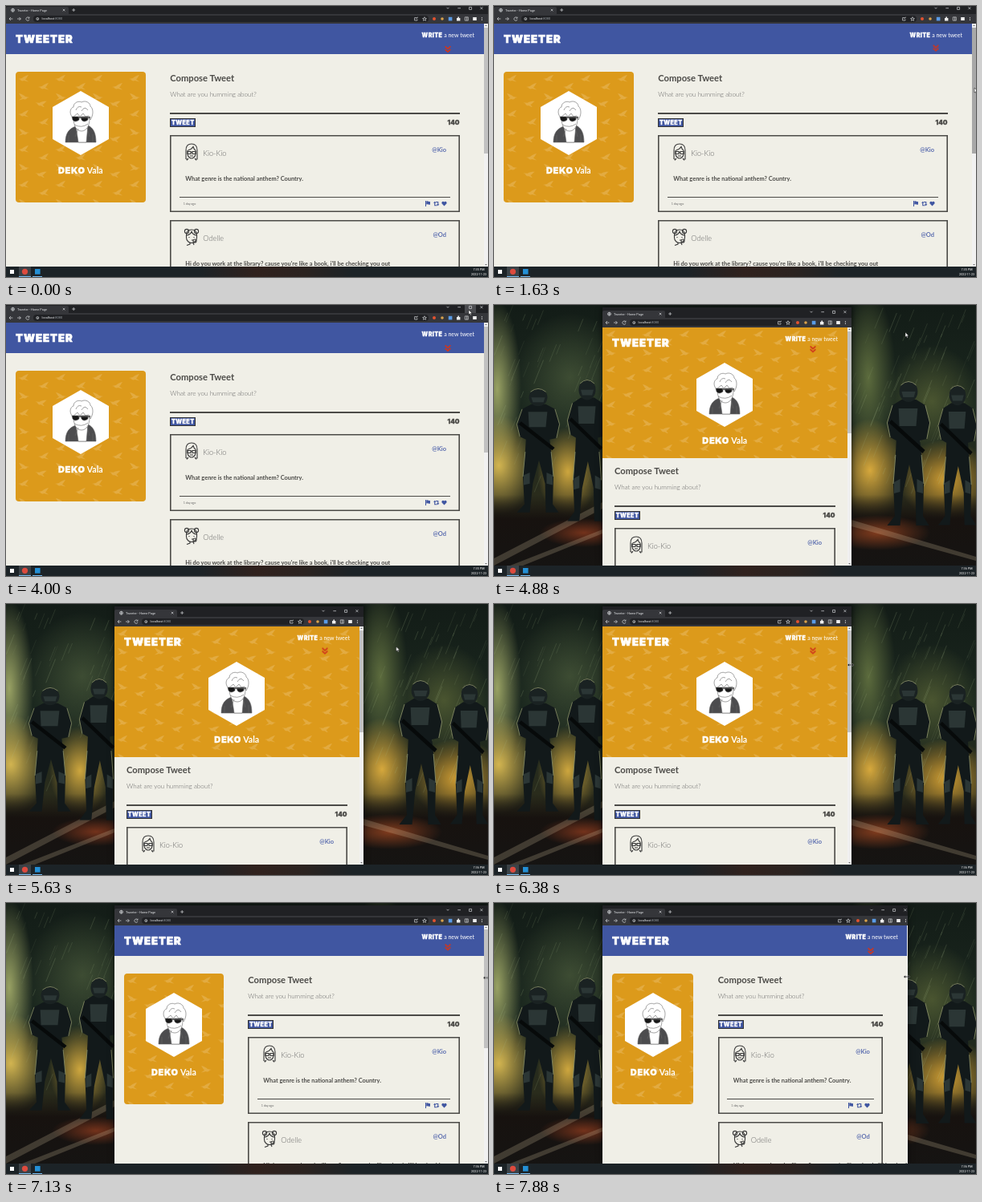
Write an HTML page that moves like this. It is 600 px wide and 338 px high and loops after 8 s.

```html
<!DOCTYPE html>
<html lang="en">
<head>
<meta charset="utf-8">
<title>Tweeter - Home Page</title>
<style>
:root { --blue: #4056a1; --gold: #dc9a1b; --cream: #f0efe7; --ink: #4b4a47; --loop: 8s linear infinite; }
html, body { margin: 0; width: 100%; height: 100%; overflow: hidden; background: #16211b; }
.stage { position: relative; width: 600px; height: 338px; overflow: hidden; font: 300 8.1px/1 Lato, "Open Sans", sans-serif; color: #666; white-space: nowrap; }
.stage * { box-sizing: border-box; }
.abs, .stage svg, .stage .bar div, .col > *, .tweet > * { position: absolute; }
svg { overflow: visible; fill: none; }
.heavy { font-family: Inter, Roboto, sans-serif; font-weight: 900; letter-spacing: .06em; -webkit-text-stroke: .3px currentColor; }

/* desktop */
.desk { inset: 0; background:
  radial-gradient(55px 18px at 112px 284px, #8a3a1ecc, transparent),
  radial-gradient(65px 22px at 478px 284px, #9c4621cc, transparent),
  linear-gradient(transparent 70%, #17120f 79%, #151413),
  radial-gradient(46px 62px at 6px 200px, #d2b450, transparent),
  radial-gradient(38px 56px at 92px 208px, #cda63e, transparent),
  radial-gradient(30px 110px at 4px 105px, #98a163, transparent),
  radial-gradient(46px 64px at 468px 206px, #d6a83c, transparent),
  radial-gradient(58px 50px at 562px 218px, #cf9d33, transparent),
  radial-gradient(34px 110px at 466px 90px, #5c6b3d, transparent),
  radial-gradient(60px 70px at 545px 120px, #4a5530, transparent),
  radial-gradient(70px 80px at 95px 90px, #3d4c33, transparent),
  linear-gradient(#131c17, #1b281f 40%, #2a2c1c 70%); }

/* browser window */
.win { bottom: 13px; overflow: hidden; background: var(--cream); box-shadow: 0 0 7px #000a; animation: win var(--loop); }
.layout { top: 0; bottom: 0; left: 0; container-type: inline-size; animation: layout var(--loop); }
@keyframes win {
  0%, 53.1% { left: 0; top: -3px; width: 600px; }
  53.11%, 80.6% { left: 135px; top: 3px; width: 310px; }
  87.5%, 90% { left: 135px; top: 3px; width: 465px; }
  98.5% { left: 135px; top: 3px; width: 380px; }
  100% { left: 135px; top: 3px; width: 365px; }
}
@keyframes layout {
  0%, 53.1% { width: 600px; }
  53.11%, 81.1% { width: 310px; }
  88%, 90.5% { width: 465px; }
  99% { width: 380px; }
  100% { width: 370px; }
}
.bar { inset: 0 0 auto; height: 25px; background: #202124; font: 400 3.9px/1 Roboto, sans-serif; color: #e8eaed; }
.bar .tab { left: 0; top: 4px; width: 78px; height: 10px; background: #35363a; border-radius: 2px 2px 0 0; padding: 2.5px 0 0 14px; }
.bar .tools { left: 0; right: 0; top: 13px; height: 12px; background: #35363a; }
.bar .url { left: 34px; right: 74px; top: 2px; height: 8px; border-radius: 4px; background: #202124; padding: 2.2px 0 0 10.5px; }
.bar i { font-style: normal; color: #9aa0a6; }
.bar svg { top: 0; stroke: #d5d7da; stroke-width: .7; }
.hover { right: 15px; top: 0; width: 14px; height: 13px; background: #4a4b4f; opacity: 0; animation: hover var(--loop); }
@keyframes hover { 0%, 48% { opacity: 0; } 48.01%, 53.1% { opacity: 1; } 53.11%, 100% { opacity: 0; } }

/* page */
.page { --w: calc(100cqw - 5.5px); top: 25px; bottom: 0; left: 0; width: var(--w); background: var(--cream); overflow: hidden; }
.head { inset: 0 0 auto; height: 38px; background: var(--blue); color: #fff; z-index: 1; }
.logo { left: 12px; top: 12.9px; font-size: 13px; letter-spacing: .08em; -webkit-text-stroke-width: .7px; }
.write { right: 11.5px; top: 10.5px; font-size: 7px; font-weight: 400; }
.write b { font-size: 7.1px; }
.head svg { right: 40px; top: 0; width: 10px; height: 10px; stroke: #d0361d; stroke-width: 1.6; animation: bob 1s cubic-bezier(.37,0,.63,1) infinite alternate; }
@keyframes bob { from { transform: translateY(27px); } to { transform: translateY(22px); } }
.profile { left: 12px; top: 60px; width: calc(var(--w) * .28 - 4.8px); height: 163px; background: var(--gold); border-radius: 4px; overflow: hidden; outline: .8px dashed #f0efe777; outline-offset: -.6px; }
.profile .birds { width: 100%; height: 100%; }
.profile .hex { left: calc(50% - 35px); top: 24px; width: 70px; height: 80px; }
.name { left: 0; right: 0; top: 117.5px; text-align: center; color: #fff; font-size: 10.6px; font-weight: 700; }
.name b { font-size: 11px; }
.col { left: calc(var(--w) * .281 + 37.2px); right: 30px; top: 0; bottom: 0; }
.col h1 { margin: 0; top: 61.5px; font-size: 11.2px; font-weight: 700; color: var(--ink); }
.ask { top: 84px; }
.rule { left: 0; right: 0; top: 111.2px; height: 1.4px; background: var(--ink); }
.send { left: 0; top: 117.5px; width: 32px; height: 11.5px; border: 1px solid #333; background: var(--blue); color: #fff; font-size: 7.2px; text-align: center; padding-top: 1.3px; }
.count { right: 0; top: 119px; font-size: 8px; color: var(--ink); letter-spacing: 0; }
.tweet { left: 0; right: 0; height: 96px; box-shadow: inset 0 0 0 1.6px var(--ink); }
.tweet .face { left: 17px; top: 10px; width: 20px; height: 22px; stroke: #3a3a3a; stroke-width: 1.1; }
.tweet .who { left: 41px; top: 17.5px; font-size: 9.1px; }
.tweet .at { right: 16.5px; top: 14.5px; font-size: 7.5px; font-weight: 700; color: #5b6daf; }
.tweet .say { left: 19px; top: 50.5px; font-size: 7.4px; font-weight: 700; color: var(--ink); }
.tweet hr { margin: 0; border: 0; left: 11.5px; right: 11.5px; top: 76.8px; height: 1.4px; background: var(--ink); }
.tweet .ago { left: 16.5px; top: 84px; font-size: 3.7px; font-weight: 400; }
.tweet .acts { right: 16px; top: 82px; width: 27px; height: 7px; fill: var(--blue); }
.scroll { right: 0; top: 25px; bottom: 0; width: 5.5px; background: #f1f1f1; }
.scroll svg { fill: #666; }
.thumb { left: .6px; right: .4px; top: 5px; height: 148px; background: #c1c1c1; animation: thumb var(--loop); }
@keyframes thumb { 0%, 19.5% { background: #c1c1c1; } 19.51%, 42% { background: #a8a8a8; } 42.01%, 100% { background: #c1c1c1; } }
@container (min-width: 550px) { .thumb { height: 157px; } }
@container (max-width: 326px) {
  .head { background: none; }
  .head svg { right: 38px; }
  .profile { left: 0; top: 0; width: 100%; border-radius: 0; outline: 0; }
  .profile .hex { top: 44px; }
  .name { top: 135.5px; }
  .col { left: 15px; right: 15px; top: 111px; }
  .thumb { height: 127px; }
}

/* taskbar and pointer */
.task { left: 0; right: 0; bottom: 0; height: 13px; background: linear-gradient(90deg, #1c2327 40%, #30211d 52%, #2b2320 62%, #1c2327 72%); font: 400 3.8px/1 Roboto, sans-serif; color: #fff; }
.task .time, .task .date { right: 2px; width: 19px; text-align: center; }
.time { top: 2.2px; animation: early var(--loop); }
.time.late { animation-name: late; }
.date { top: 7.8px; }
@keyframes early { 0%, 57.75% { opacity: 1; } 57.76%, 100% { opacity: 0; } }
@keyframes late { 0%, 57.75% { opacity: 0; } 57.76%, 100% { opacity: 1; } }
.pointer { animation: point var(--loop); }
.pointer .arrow { animation: arrow var(--loop); }
.pointer .size { animation: size var(--loop); }
@keyframes arrow { 0%, 78% { opacity: 1; } 78.01%, 100% { opacity: 0; } }
@keyframes size { 0%, 78% { opacity: 0; } 78.01%, 100% { opacity: 1; } }
@keyframes point {
  0%, 18.6% { transform: translate(606px, 108px); }
  20.4% { transform: translate(598px, 102px); }
  30% { transform: translate(598px, 96px); }
  38% { transform: translate(597px, 60px); }
  44% { transform: translate(588px, 22px); }
  48.5%, 54% { transform: translate(576px, 6px); }
  58% { transform: translate(524px, 30px); }
  61% { transform: translate(512px, 34px); }
  68% { transform: translate(500px, 45px); }
  76% { transform: translate(452px, 72px); }
  78.5%, 80.6% { transform: translate(444px, 76px); }
  87.5% { transform: translate(598px, 92px); }
  90% { transform: translate(598px, 94px); }
  98.5% { transform: translate(514px, 92px); }
  100% { transform: translate(499px, 92px); }
}
</style>
</head>
<body>
<div class="stage">
  <div class="abs desk">
    <svg width="600" height="338">
      <defs>
        <g id="guard">
          <path fill="#12191a" d="M-9 23L-21 30L-28 52L-24 70L-16 74L-17 92L-20 128L-18 168L-28 180H-11L-7 138L1 104L9 138L10 180H27L19 168L20 128L17 92L15 74L24 72L28 52L22 30L10 23Z"/>
          <ellipse cy="13" rx="12" ry="13" fill="#1a2222"/>
          <path fill="#2b3635" d="M-9 13H9L7 20H-7ZM-13 34H12L10 56H-12ZM-19 126L-11 122V138L-19 140ZM19 126L11 122V138L19 140Z"/>
          <path stroke="#070a0a" stroke-width="5" d="M-24 50L20 88"/>
          <path stroke="#8b9168" stroke-width=".9" d="M-10 5Q0-4 10 5M-21 30L-28 52L-24 70M22 30L28 52L24 72M-17 92L-20 128M17 92L20 128"/>
        </g>
      </defs>
      <path fill="#d8c9a4" opacity=".22" d="M0 316L135 246V254L0 325ZM20 325L135 280V285L36 325ZM445 268L600 314V319L445 276Z"/>
      <g id="rain" stroke="#a9bd8c" stroke-width=".6"></g>
      <use href="#guard" transform="translate(55 104) scale(.95 .86)"/>
      <use href="#guard" transform="translate(116 93) scale(.88 .98)"/>
      <use href="#guard" transform="translate(577 100) scale(.86 .97)"/>
      <use href="#guard" transform="translate(516 95) scale(.95 1)"/>
    </svg>
  </div>

  <div class="abs win"><div class="abs layout">
    <div class="abs bar">
      <div class="tab">Tweeter - Home Page</div>
      <div class="tools"><div class="url">localhost<i>:8080</i></div></div>
      <div class="hover"></div>
      <svg width="90" height="25">
        <circle cx="8.5" cy="8.2" r="2"/><path d="M6.5 8.2H10.5M8.5 6.2V10.2M70.8 6.8L73.4 9.4M73.4 6.8L70.8 9.4M82.2 8H86.2M84.2 6V10"/>
        <path d="M8.4 19H4M6 17L4 19L6 21M14 19H18.4M16.4 17L18.4 19L16.4 21M28.8 18A2.1 2.1 0 1 0 29 19.8M29 16.6V18.2H27.4"/>
        <circle cx="39.3" cy="19" r="1.5"/><path d="M39.3 18.6V20"/>
      </svg>
      <svg style="right:0" width="100" height="25">
        <path d="M48.5 4.8L50 6.3L51.5 4.8M62.3 5.7H66M76.6 4.4H79.6V7.4H76.6ZM90.4 4.2L93.4 7.2M93.4 4.2L90.4 7.2"/>
        <path d="M11.6 17.6H8.6V21H12V19.6M10.4 19L13 16.8M21 16.7L21.7 18.4L23.4 18.5L22.1 19.6L22.5 21.3L21 20.4L19.5 21.3L19.9 19.6L18.6 18.5L20.3 18.4Z"/>
        <g stroke="none"><circle cx="33" cy="19" r="2" fill="#e2522f"/><circle cx="43" cy="19" r="1.8" fill="#d9a24b"/><path fill="#5a9be6" d="M50.8 16.8h4.6v4.6h-4.6z"/><path fill="#eee" d="M61 18h1.4v-1.4h1.6V18h1.4v3.4H61ZM81.2 17h4.6v4h-4.6z"/><circle cx="92.4" cy="17.4" r=".5" fill="#eee"/><circle cx="92.4" cy="19" r=".5" fill="#eee"/><circle cx="92.4" cy="20.6" r=".5" fill="#eee"/></g>
        <path d="M71.3 16.9H75.3V21.1H71.3ZM73.6 17V21"/>
      </svg>
    </div>

    <div class="abs page">
      <div class="abs head">
        <div class="abs logo heavy">TWEETER</div>
        <div class="abs write"><b class="heavy">WRITE</b> a new tweet</div>
        <svg viewBox="0 0 10 10"><path d="M1.6 1.4L5 4.4L8.4 1.4M1.6 5.2L5 8.2L8.4 5.2"/></svg>
      </div>
      <div class="abs profile">
        <svg class="birds">
          <pattern id="flock" width="46" height="44" patternUnits="userSpaceOnUse">
            <g fill="#ecc374" opacity=".42">
              <path id="bird" d="M3 9L8 8C10 6 12 5 16 4C14 6.500 14 8 12 9.400L16 12.500L10.500 11C8 12 6 11 5.600 9.600Z"/>
              <use href="#bird" transform="translate(25 10)"/>
              <use href="#bird" transform="translate(20 23) scale(-1 1)"/>
              <use href="#bird" transform="translate(24 29) rotate(14)"/>
            </g>
          </pattern>
          <rect width="100%" height="100%" fill="url(#flock)"/>
        </svg>
        <svg class="hex" viewBox="0 0 70 80">
          <path fill="#fff" d="M35 0L70 20V60L35 80L0 60V20Z"/>
          <g stroke="#666" stroke-width=".6" fill="#fff">
            <path fill="#4c4c4e" d="M16 64C16 53 20 47 29 44L36 52L44 43C51 46 54 53 54 64Z"/>
            <path d="M29 44L32 64H42L44 43Z"/>
            <path d="M26 33C26 44 30 50 36 50C42 50 46 44 46 34Z"/>
            <path d="M25 33C20 28 22 21 26 20C26 14 33 12 36 14C41 11 47 15 47 19C51 22 51 30 47 36L45 31L41 32L38 28L34 32L31 28Z"/>
            <path fill="none" d="M29 24Q31 18 36 20M36 25Q40 18 44 24M27 42Q36 47 44 41M20 64V55M50 64V54M32 47L28 57M43 46L46 57"/>
            <path fill="#161616" d="M24 32H33V36Q28 40 25 36ZM35 32H44V36Q39 40 36 36ZM32 32.5H47V33.6H32Z"/>
          </g>
        </svg>
        <div class="abs name"><b class="heavy">DEKO</b> Vala</div>
      </div>
      <div class="abs col" id="col">
        <h1>Compose Tweet</h1>
        <div class="ask">What are you humming about?</div>
        <div class="rule"></div>
        <div class="send heavy">TWEET</div>
        <div class="count heavy">140</div>
      </div>
    </div>
    <div class="abs scroll">
      <svg width="5" height="5"><path d="M1.2 3L2.5 1.6L3.8 3Z"/></svg>
      <div class="abs thumb"></div>
      <svg width="5" height="5" style="bottom:0"><path d="M1.2 2L2.5 3.4L3.8 2Z"/></svg>
    </div>
  </div></div>

  <div class="abs task">
    <svg width="60" height="13">
      <path fill="#3b4247" d="M16 0h15v13H16z"/>
      <path fill="#fff" d="M5 4h5v5H5z"/>
      <circle cx="23.5" cy="6.3" r="3.6" fill="#dd4b3e"/>
      <path fill="#2490d6" d="M36 3h6.600v6.600H36z"/>
      <path fill="#76b9ed" d="M16 12h15v1H16zM33 12h12v1H33z"/>
    </svg>
    <div class="abs time">7:35 PM</div>
    <div class="abs time late">7:36 PM</div>
    <div class="abs date">2022-11-23</div>
  </div>

  <svg class="pointer" width="1" height="1" style="left:0;top:0">
    <path class="arrow" fill="#fff" stroke="#111" stroke-width=".5" d="M0 0V6L1.4 4.8L2.4 7L3.4 6.5L2.4 4.4H4.3Z"/>
    <path class="size" fill="#000" stroke="#ddd" stroke-width=".35" d="M-4 0L-1.8-1.8V-.5H1.8V-1.8L4 0L1.8 1.8V.5H-1.8V1.8Z"/>
  </svg>
</div>

<script>
const faces = [
  '<path d="M3 20V9C3 3 6 1 10 1S17 3 17 9V20H14M3 20H6M5.5 9Q10 8 12 4.5Q13 8 15 9M5 9V13C5 17 8 19 10 19S15 17 15 13V9M8 16H12M6 19L4 21.5M14 19L16 21.5"/><path d="M5 10.5H9V13.5H5ZM11 10.5H15V13.5H11ZM9 11.5H11"/>',
  '<circle cx="4" cy="4" r="2.6"/><circle cx="16" cy="4" r="2.6"/><path d="M3.5 9C3.5 4 6 2 10 2S16.5 4 16.5 9V12C16.5 16 13 18.5 10 18.5S3.5 16 3.5 12ZM4 9Q9 8 10 4Q11 8 16 9M7 11V12M13 11V12M8 18.5V20L4 21.5M12 18.5L13 21M10 15H12"/><circle cx="14" cy="16" r="2"/>'
];
const acts = '<path d="M0 0H1V7H0ZM1.3 .4Q3 0 4 .8T6 .7V4.5Q5 5 4 4.5T1.3 4.6Z"/>' +
  '<path d="M10 2.8L11.7 .8L13.4 2.8H12.3V5.2H14.6V6.2H11.2V2.8ZM12.5 .9H16.3V4.3H17.4L15.7 6.3L14 4.3H15.2V1.9H13.4Z"/>' +
  '<path d="M23.5 6.6L20.6 3.6C19.5 1.5 22 -.4 23.5 1.5C25 -.4 27.5 1.5 26.4 3.6Z"/>';
const tweets = [
  ['Kio-Kio', '@Kio', 'What genre is the national anthem? Country.'],
  ['Odelle', '@Od', "Hi do you work at the library? cause you're like a book, i'll be checking you out"]
];
document.getElementById('col').insertAdjacentHTML('beforeend', tweets.map(([who, at, say], i) => `
  <div class="tweet" style="top:${139 + i * 106}px">
    <svg class="face" viewBox="0 0 20 22">${faces[i]}</svg>
    <div class="who">${who}</div><div class="at">${at}</div>
    <div class="say">${say}</div><hr>
    <div class="ago">1 day ago</div>
    <svg class="acts" viewBox="0 0 27 7">${acts}</svg>
  </div>`).join(''));

// slanted rain with a fixed seed
let seed = 7;
const rand = () => (seed = seed * 16807 % 2147483647) / 2147483647;
let drops = '';
for (let i = 0; i < 150; i++) {
  const x = rand() * 310, y = rand() * 220, len = 8 + rand() * 22;
  drops += `<path opacity="${(.1 + rand() * .25).toFixed(2)}" d="M${x < 150 ? x : x + 290} ${y}l${-len * .4} ${len}"/>`;
}
document.getElementById('rain').innerHTML = drops;
</script>
</body>
</html>
```
